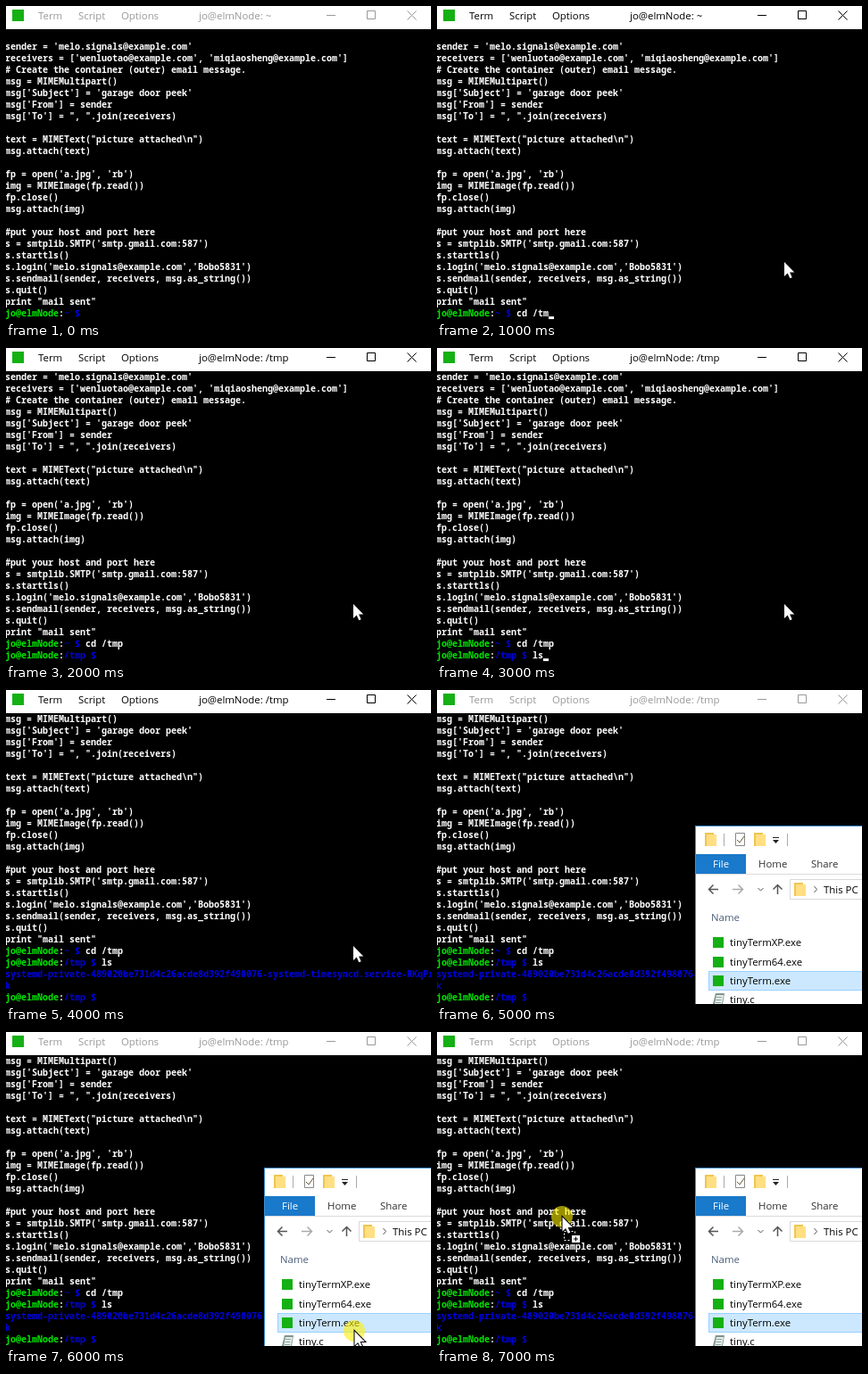
An HTML page with a canvas for the animation above (8 s loop, 476 by 352 pixels).

```html
<!DOCTYPE html>
<html lang="en">
<head>
<meta charset="utf-8">
<title>Terminal session</title>
<style>
html, body { margin: 0; overflow: hidden; background: #000; }
canvas { display: block; }
</style>
</head>
<body>
<canvas id="stage" width="476" height="352"></canvas>
<script>
const ctx = document.getElementById('stage').getContext('2d');
const W = 476, H = 352, LOOP = 8000;
const ROW = 13, COL = 6, TOP = 26, ROWS = 25;
const MONO = '600 10px "Noto Sans Mono", monospace';
const UI = '11.4px "Open Sans", sans-serif';
const GREEN = '#00e800', BLUE = '#0000e0', LOGO = '#14b014';

const script = String.raw`
sender = 'melo.signals@example.com'
receivers = ['wenluotao@example.com', 'miqiaosheng@example.com']
# Create the container (outer) email message.
msg = MIMEMultipart()
msg['Subject'] = 'garage door peek'
msg['From'] = sender
msg['To'] = ", ".join(receivers)

text = MIMEText("picture attached\n")
msg.attach(text)

fp = open('a.jpg', 'rb')
img = MIMEImage(fp.read())
fp.close()
msg.attach(img)

#put your host and port here
s = smtplib.SMTP('smtp.gmail.com:587')
s.starttls()
s.login('melo.signals@example.com','Bobo5831')
s.sendmail(sender, receivers, msg.as_string())
s.quit()
print "mail sent"`.split('\n').map(line => [[line, '#fff']]);

const listing = 'systemd-private-489020be731d4c26acde8d392f498076-systemd-timesyncd.service-RKqPr';
const prompt = (dir, command = '') =>
  [['jo@elmNode', GREEN], [':', '#fff'], [dir + ' $ ', BLUE], [command, '#fff']];

function rect(x, y, w, h, color) {
  ctx.fillStyle = color;
  ctx.fillRect(x, y, w, h);
}

function text(str, x, y, color, font = UI) {
  ctx.font = font;
  ctx.fillStyle = color;
  ctx.fillText(str, x, y);
}

function stroke(d, color, width = 1) {
  ctx.strokeStyle = color;
  ctx.lineWidth = width;
  ctx.stroke(new Path2D(d));
}

function fill(d, color) {
  ctx.fillStyle = color;
  ctx.fill(new Path2D(d));
}

function terminal(second) {
  const lines = [...script];
  if (second < 2) lines.push(prompt('~', second ? 'cd /tm' : ''));
  else {
    lines.push(prompt('~', 'cd /tmp'));
    if (second < 4) lines.push(prompt('/tmp', second === 3 ? 'ls' : ''));
    else lines.push(prompt('/tmp', 'ls'), [[listing, BLUE]], [['k', BLUE]], prompt('/tmp'));
  }
  rect(0, 0, W, H, '#000');
  let col = 0;
  lines.slice(-ROWS).forEach((line, row) => {
    col = 0;
    for (const [str, color] of line) {
      text(str, col * COL - 1, TOP + row * ROW + 10, color, MONO);
      col += str.length;
    }
  });
  if (second === 1 || second === 3) rect(col * COL - 1, 348, 6, 3, '#fff');
}

function titleBar(second) {
  const active = second >= 1 && second <= 4;
  const color = active ? '#000' : '#999';
  rect(0, 0, W, TOP, '#fff');
  rect(7, 4, 13, 13, LOGO);
  text('Term', 36, 15, color);
  text('Script', 81, 15, color);
  text('Options', 129, 15, color);
  text('jo@elmNode: ' + (second < 2 ? '~' : '/tmp'), 216, 15, color);
  stroke('M359 10.5h10M404.5 5.5h9v9h-9zM449.5 5.5l10 10M459.5 5.5l-10 10', color);
}

function folder(x, y) {
  rect(x, y, 10, 15, '#f0c550');
  rect(x + 2, y + 2, 11, 13, '#ffdf82');
}

function explorer() {
  rect(289, 152, 187, 200, '#3f8fd0');
  rect(290, 153, 186, 199, '#fff');

  folder(300, 160);
  stroke('M321.5 161v14M392.5 161v14', '#aaa');
  stroke('M334.5 160.5h10v14h-10z', '#888');
  stroke('M336 168l3 3l5-7', '#665533');
  folder(355, 160);
  stroke('M376 165.5h7', '#222');
  fill('M376 168h7l-3.5 4z', '#222');

  rect(290, 184, 56, 22, '#1979ca');
  text('File', 309, 199, '#fff');
  text('Home', 360, 199, '#333');
  text('Share', 419, 199, '#333');
  rect(290, 206, 186, 1, '#dadbdc');

  stroke('M315 223.5h-10M309.5 218.5l-5 5l5 5', '#555', 1.5);
  stroke('M331 223.5h11M337.5 218.5l5 5l-5 5', '#aaa', 1.5);
  stroke('M359.5 222l3 3l3-3', '#555');
  stroke('M381.5 229v-10M376.5 223.5l5-5l5 5', '#555', 1.5);
  stroke('M476 212.5h-80.5v22h80.5', '#d9d9d9');
  folder(400, 216);
  stroke('M422.5 220l3 3.5l-3 3.5', '#555');
  text('This PC', 433, 228, '#000');

  text('Name', 307, 259, '#4c607a');
  rect(304, 315, 172, 22, '#99d1ff');
  rect(305, 316, 171, 20, '#cce8ff');
  ['tinyTermXP.exe', 'tinyTerm64.exe', 'tinyTerm.exe', 'tiny.c'].forEach((name, i) => {
    const y = Math.round(287.3 + i * 21.3);
    if (i < 3) rect(309, y - 10, 12, 12, LOGO);
    text(name, 328, y, '#000');
  });
  fill('M312 340h10l-2 12h-11z', '#7f938c');
  fill('M313 342h8l-2 10h-8z', '#e4eeea');
  stroke('M313 344.5h6M312.5 347.5h6M312 350.5h6', '#8fa39c');
}

function pointer(x, y, halo) {
  ctx.save();
  ctx.translate(x, y);
  if (halo) {
    ctx.beginPath();
    ctx.arc(0, 0, 12, 0, Math.PI * 2);
    ctx.fillStyle = 'rgba(255, 240, 0, .6)';
    ctx.fill();
  }
  const arrow = 'M.5 .5v16l3.7-3.6l2.6 5.8l2.4-1l-2.6-5.6h5.2z';
  stroke(arrow, '#000', 2);
  fill(arrow, '#fff');
  ctx.restore();
}

function copyBadge() {
  ctx.setLineDash([2, 2]);
  stroke('M142.5 223.5h12v10h-12z', '#fff');
  ctx.setLineDash([]);
  rect(150, 227, 10, 10, '#000');
  rect(151, 228, 9, 8, '#fff');
  stroke('M153 232h5M155.5 229.5v5', '#000');
}

function draw(now) {
  const second = Math.floor(now % LOOP / 1000);
  terminal(second);
  titleBar(second);
  if (second >= 5) explorer();
  if (second >= 1 && second <= 4) pointer(388.5, 286.5);
  if (second === 6) pointer(390, 335, true);
  if (second === 7) {
    pointer(140, 207, true);
    copyBadge();
  }
}

const start = performance.now();
function tick() {
  draw(performance.now() - start);
  requestAnimationFrame(tick);
}
tick();
</script>
</body>
</html>
```
